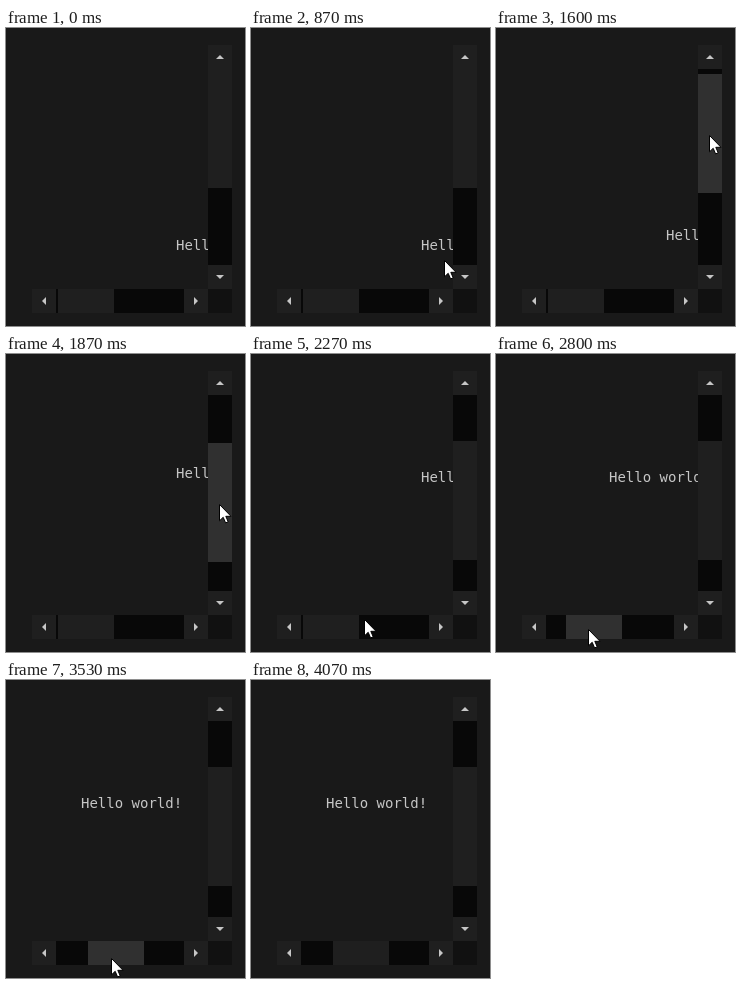
Animation, 239 px wide and 298 px high, one loop 4.79 s. Source, as an HTML page:

```html
<!DOCTYPE html>
<html lang="en">
<head>
<meta charset="utf-8">
<title>Custom scrollbars</title>
<style>
  html, body { margin: 0; width: 100%; height: 100%; overflow: hidden; background: #191919; }
  svg { display: block; width: 239px; height: 298px; }
  rect { shape-rendering: crispEdges; }
  text { font: 14px "DejaVu Sans Mono", "Liberation Mono", monospace; fill: #c6c6c6; white-space: pre; }
  .track { fill: #080808; }
  .part { fill: #1f1f1f; }
  .hot { fill: #303030; }
  .corner { fill: #111; }
  .arrow { fill: #c6c6c6; }
</style>
</head>
<body>
<svg viewBox="0 0 239 298">
  <defs><clipPath id="view"><rect x="26" y="17" width="176" height="244"/></clipPath></defs>
  <g clip-path="url(#view)"><text id="label">Hello world!</text></g>

  <rect class="track" x="202" y="17" width="24" height="244"/>
  <rect class="part" x="202" y="17" width="24" height="24"/>
  <rect class="part" x="202" y="237" width="24" height="24"/>
  <rect id="thumbY" class="part" x="202" y="41" width="24" height="119"/>

  <rect class="track" x="26" y="261" width="176" height="24"/>
  <rect class="part" x="26" y="261" width="24" height="24"/>
  <rect class="part" x="178" y="261" width="24" height="24"/>
  <rect id="thumbX" class="part" x="50" y="261" width="56" height="24"/>
  <rect class="corner" x="202" y="261" width="24" height="24"/>

  <path class="arrow" d="M210 31l4-4 4 4zM210 247l4 4 4-4zM40 269l-4 4 4 4zM188 269l4 4-4 4z"/>
  <path id="cursor" fill="#fff" stroke="#000" d="M.5 .5V16.8L4.2 13.3 6.6 18.9 9.2 17.8 6.8 12.3H12Z"/>
</svg>
<script>
  const LOOP = 4790, FPS = 15;
  const GRAB_X = 72.7, GRAB_Y = 102;
  const SCROLL_X = 402 / 128, SCROLL_Y = 402 / 196;

  // All times below are steps of 1 / FPS seconds.
  const enter = 7, leave = 61;
  const dragY = { from: 23, to: 30 }, dragX = { from: 39, to: 53 };

  // Key points of the pointer: step, x, y
  const path = [
    [enter, 224, 288], [14, 187, 219], [18, 168, 158], [21, 200, 107],
    [dragY.from, 213, 102], [28, 213, 150], [dragY.to, 213, 148],
    [34, 113, 265], [38, 73, 274], [42, 92.4, 275], [46, 111, 278],
    [47, 109, 278], [dragX.to, 105, 278], [58, 105, 278], [60, 78, 293]
  ];

  const byId = id => document.getElementById(id);
  const [label, thumbX, thumbY, cursor] = ["label", "thumbX", "thumbY", "cursor"].map(byId);
  const clamp = (v, lo, hi) => Math.min(hi, Math.max(lo, v));

  const slope = (i, k) => path[i] && path[i + 1]
    ? (path[i + 1][k] - path[i][k]) / (path[i + 1][0] - path[i][0]) : 0;

  function tangent(i, k) {
    const a = slope(i - 1, k), b = slope(i, k);
    return a * b > 0 ? 2 * a * b / (a + b) : 0;
  }

  // Monotone cubic through the key points, so that no segment overshoots.
  function pointer(step, k) {
    const s = clamp(step, enter, path[path.length - 1][0]);
    let i = 0;
    while (i < path.length - 2 && s >= path[i + 1][0]) i++;
    const a = path[i], b = path[i + 1], d = b[0] - a[0];
    const u = (s - a[0]) / d, v = 1 - u;
    return a[k] * (1 + 2 * u) * v * v + b[k] * (3 - 2 * u) * u * u +
      d * u * v * (tangent(i, k) * v - tangent(i + 1, k) * u);
  }

  // Thumb offset: follows the pointer while dragged, then stays.
  const offset = (step, drag, k, grab) =>
    Math.max(0, Math.round(pointer(clamp(step, drag.from, drag.to), k) - grab));

  function setThumb(el, attr, pos, hot) {
    el.setAttribute(attr, pos);
    el.setAttribute("class", hot ? "hot" : "part");
  }

  function draw(ms) {
    const step = Math.floor((ms % LOOP + 4) * FPS / 1000);
    const dx = offset(step, dragX, 1, GRAB_X);
    const dy = offset(step, dragY, 2, GRAB_Y);

    setThumb(thumbX, "x", 50 + dx, step >= 35 && step < leave);
    setThumb(thumbY, "y", 41 + dy, step >= 22 && step <= dragY.to);
    label.setAttribute("x", 176 - Math.round(dx * SCROLL_X));
    label.setAttribute("y", 222 - Math.round(dy * SCROLL_Y));

    cursor.style.display = step >= enter && step < leave ? "" : "none";
    const [x, y] = [1, 2].map(k => Math.round(pointer(step, k)));
    cursor.setAttribute("transform", `translate(${x} ${y})`);
  }

  const start = performance.now();
  function tick() {
    draw(performance.now() - start);
    requestAnimationFrame(tick);
  }
  tick();
</script>
</body>
</html>
```
